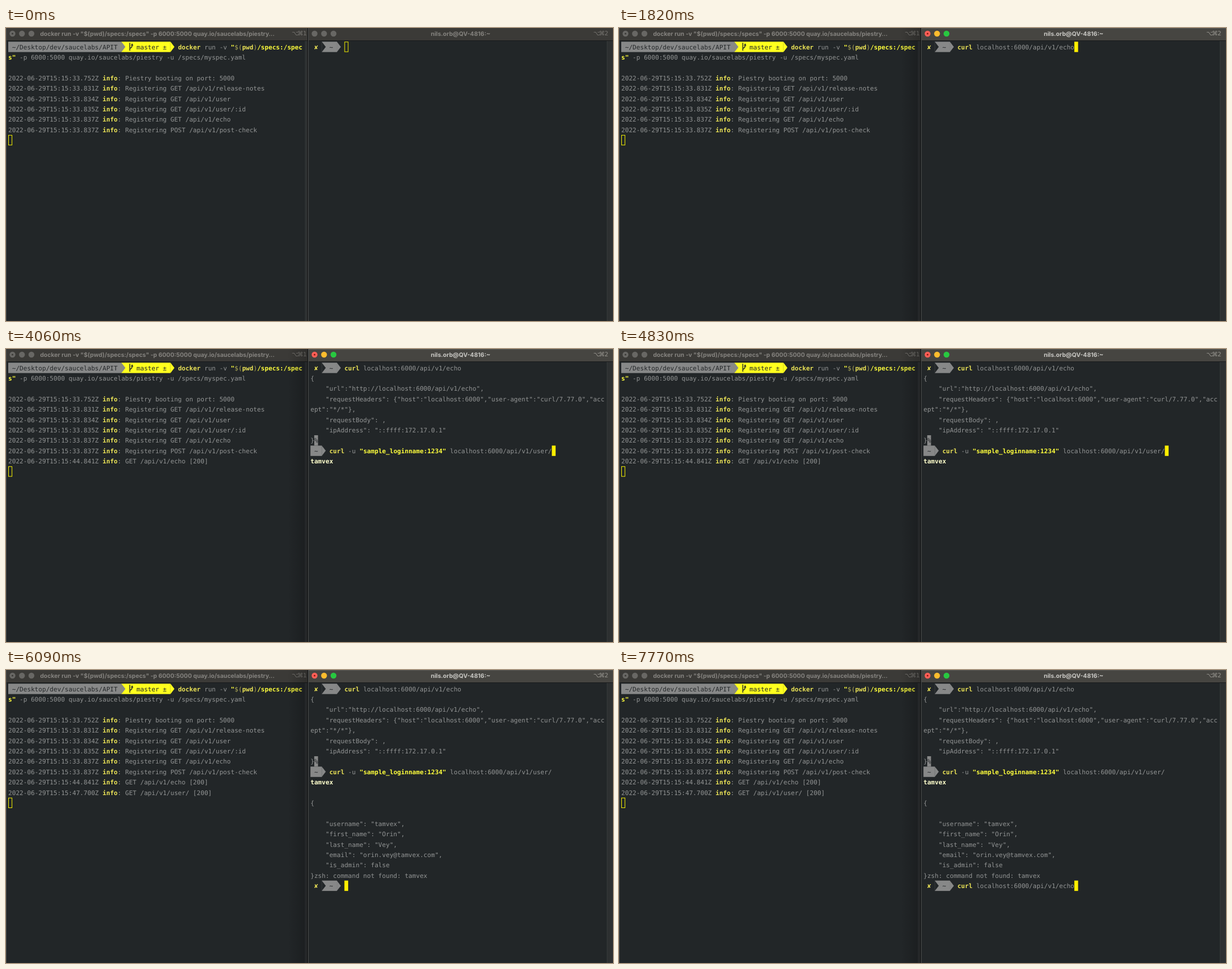
An HTML page for the animation above (8000 ms loop, 1077x520 px).

```html
<!DOCTYPE html>
<html lang="en">
<head>
<meta charset="utf-8">
<title>Two terminals</title>
<style>
  html, body { margin: 0; width: 100%; height: 100%; overflow: hidden; background: #222628; }
  svg { display: block; width: 1077px; height: 520px; }
  text { white-space: pre; text-rendering: geometricPrecision; }
  .mono { font: 11.11px "DejaVu Sans Mono", "Liberation Mono", monospace; fill: #929494; }
  .dark { fill: #242729; }
  .cmd { fill: #eae256; font-weight: bold; }
  .str { fill: #ffff3c; font-weight: bold; }
  .soft { fill: #b3ae58; }
  .pale { fill: #ffffcc; font-weight: bold; }
  .title { font: 700 10.5px Inter, "Liberation Sans", sans-serif; text-anchor: middle; }
  .keys { font: 10.5px "DejaVu Sans", sans-serif; }
</style>
</head>
<body>
<svg viewBox="0 0 1077 520" xmlns="http://www.w3.org/2000/svg">
  <defs>
    <linearGradient id="shade">
      <stop offset="0" stop-color="#000" stop-opacity="0"/>
      <stop offset="1" stop-color="#000" stop-opacity=".22"/>
    </linearGradient>
  </defs>
  <g id="stage"></g>
</svg>
<script>
const LOOP = 8000, CW = 6.692, RH = 18.39, TOP = 24.3;
const LEFT = 4, RIGHT = 540.2;
const GREY = '#878888', YELLOW = '#ffff1e', BG = '#222628';
const USER = 'tamvex', LOGIN = 'sample_loginname:1234', HOST = 'nils.orb@QV-4816:~';
const ECHO_URL = 'localhost:6000/api/v1/echo', USER_URL = 'localhost:6000/api/v1/user/';
const stage = document.getElementById('stage');

const esc = s => s.replace(/&/g, '&amp;').replace(/</g, '&lt;');
const rowY = row => TOP + row * RH;
const rect = (x, y, w, h, fill) => `<rect x="${x}" y="${y}" width="${w}" height="${h}" fill="${fill}"/>`;
const path = (d, fill) => `<path d="${d}" fill="${fill}"/>`;

// Runs are plain strings or [class, text] pairs laid out on the character grid.
function line(x0, row, col, ...runs) {
  let out = '';
  for (const run of runs) {
    const [cls, str] = Array.isArray(run) ? run : ['', run];
    out += `<text class="mono ${cls}" x="${x0 + col * CW}" y="${rowY(row) + 13.4}">${esc(str)}</text>`;
    col += str.length;
  }
  return out;
}

function block(x0, row, col, cols, fill) {
  return rect(x0 + col * CW, rowY(row), cols * CW, RH, fill);
}

function arrow(x0, row, col, fill) {
  const x = x0 + col * CW, y = rowY(row);
  return path(`M${x} ${y}l${CW + .4} ${RH / 2}L${x} ${y + RH}z`, fill);
}

function cursor(x0, row, col, solid) {
  const x = x0 + col * CW, y = rowY(row);
  return solid ? rect(x, y, CW, RH, '#ffee00')
    : `<rect x="${x + .5}" y="${y + .5}" width="${CW - .6}" height="${RH - 1}" fill="none" stroke="#f4f000"/>`;
}

function titleBar(x, w, cx, title, key, focused) {
  const ink = focused ? '#c9c8c4' : '#85837f';
  const lights = focused ? ['#fe5f57', '#febc2e', '#28c840'] : Array(3).fill('#686764');
  let out = rect(x, 0, w, 22, focused ? '#464541' : '#3b3a37') + rect(x, 22, w, 1, '#181a1b');
  if (focused) out += rect(x, 0, w, 1, '#5b5a56');
  lights.forEach((c, i) => out += `<circle cx="${x + 11.5 + i * 16.8}" cy="10" r="5.2" fill="${c}"/>`);
  if (focused || x === 0) out += `<circle cx="${x + 11.5}" cy="10" r="1.6" fill="${focused ? '#8c1a12' : '#3b3a37'}"/>`;
  out += `<text class="title" x="${cx}" y="13.6" fill="${ink}">${esc(title)}</text>`;
  const kx = x + w - (x ? 35 : 28);
  return out + `<text class="keys" x="${kx} ${kx + 10} ${kx + 20}" y="13.4" fill="${focused ? '#97958f' : '#777571'}">⌥⌘${key}</text>`;
}

const info = (row, stamp, msg) =>
  line(LEFT, row, 0, `2022-06-29T15:15:${stamp}Z `, ['cmd', 'info'], ': ' + msg);

function branchIcon() {
  const x = LEFT + 32 * CW, y = rowY(0);
  return `<g fill="none" stroke="#242729" stroke-width="1.5">` +
    `<path d="M${x + 1.5} ${y + 2}v14M${x + 1.5} ${y + 12}q4.2-1.5 4.2-6"/></g>` +
    path(`M${x + 3.4} ${y + 7}h4.4l-2.2-4.2z`, '#242729');
}

function leftPane(logs) {
  let out = block(LEFT, 0, 0, 30, GREY) + block(LEFT, 0, 30, 13, YELLOW) +
    arrow(LEFT, 0, 30, GREY) + arrow(LEFT, 0, 43, YELLOW) + branchIcon() +
    line(LEFT, 0, 1, ['dark', '~/Desktop/dev/saucelabs/APIT']) +
    line(LEFT, 0, 34, ['dark', 'master ±']) +
    line(LEFT, 0, 45, ['cmd', 'docker'], ' run -v ', ['str', '"'], ['soft', '$('],
      ['cmd', 'pwd'], ['soft', ')'], ['str', '/specs:/spec']) +
    line(LEFT, 1, 0, ['str', 's"'], ' -p 6000:5000 quay.io/saucelabs/piestry -u /specs/myspec.yaml');
  const entries = [
    ['33.752', 'Piestry booting on port: 5000'],
    ['33.831', 'Registering GET /api/v1/release-notes'],
    ['33.834', 'Registering GET /api/v1/user'],
    ['33.835', 'Registering GET /api/v1/user/:id'],
    ['33.837', 'Registering GET /api/v1/echo'],
    ['33.837', 'Registering POST /api/v1/post-check'],
    ['44.841', 'GET /api/v1/echo [200]'],
    ['47.700', 'GET /api/v1/user/ [200]']
  ].slice(0, 6 + logs);
  entries.forEach(([stamp, msg], i) => out += info(3 + i, stamp, msg));
  return out + cursor(LEFT, 3 + entries.length, 0, false);
}

// Shell prompt; returns the markup and the column where input starts.
function prompt(row, failed) {
  const at = failed ? 3 : 0, tilde = failed ? 5 : 1, end = failed ? 7 : 3;
  let out = block(RIGHT, row, at, end - at, GREY) + arrow(RIGHT, row, end, GREY);
  if (failed) out += arrow(RIGHT, row, 3, BG) + line(RIGHT, row, 1, ['cmd', '✘']);
  return [out + line(RIGHT, row, tilde, ['dark', '~']), end + 2];
}

const commands = {
  none: () => ['', 0],
  echo: (row, col) => [line(RIGHT, row, col, ['cmd', 'curl'], ' ' + ECHO_URL), 5 + ECHO_URL.length],
  user: (row, col) => [
    line(RIGHT, row, col, ['cmd', 'curl'], ' -u ', ['str', `"${LOGIN}"`], ' ' + USER_URL) +
    line(RIGHT, row + 1, 0, ['pale', USER]),
    11 + LOGIN.length + USER_URL.length]
};

function input(row, failed, name) {
  const [head, col] = prompt(row, failed);
  const [body, len] = commands[name](row, col);
  return { svg: head + body, at: [row, col + len] };
}

const echoOutput = () => [
  '{',
  `    "url":"http://${ECHO_URL}",`,
  '    "requestHeaders": {"host":"localhost:6000","user-agent":"curl/7.77.0","acc',
  'ept":"*/*"},',
  '    "requestBody": ,',
  '    "ipAddress": "::ffff:172.17.0.1"',
  '}'
].map((s, i) => line(RIGHT, 1 + i, 0, s)).join('') +
  block(RIGHT, 7, 1, 1, GREY) + line(RIGHT, 7, 1, ['dark', '%']);

const userOutput = done => [
  '{', '',
  `    "username": "${USER}",`,
  '    "first_name": "Orin",',
  '    "last_name": "Vey",',
  `    "email": "orin.vey@${USER}.com",`,
  '    "is_admin": false',
  '}' + (done ? `zsh: command not found: ${USER}` : '')
].map((s, i) => line(RIGHT, 11 + i, 0, s)).join('');

function rightPane(t) {
  const first = input(0, true, t < 1190 ? 'none' : t < 1820 ? 'user' : 'echo');
  let out = first.svg, at = first.at;
  if (t >= 2730) at = [1, 0];
  if (t >= 3010) { out += echoOutput(); at = [8, 0]; }
  if (t >= 3080) {
    const second = input(8, false, t < 3570 ? 'none' : t < 4060 ? 'echo' : 'user');
    out += second.svg;
    at = second.at;
  }
  if (t >= 5880) at = [11, 0];
  if (t >= 6020) { out += userOutput(t >= 6090); at = [18, 1]; }
  if (t >= 6090) {
    const third = input(19, true, t < 7280 ? 'none' : t < 7700 ? 'user' : 'echo');
    out += third.svg;
    at = third.at;
  }
  return out + cursor(RIGHT, ...at, t >= 630);
}

function rightTitle(t) {
  if (t >= 2730 && t < 3010) return 'curl ' + ECHO_URL;
  if (t >= 5880 && t < 6020) return `curl -u "${LOGIN}" ${USER_URL} ${USER}`;
  return HOST;
}

function render(t) {
  const focused = t >= 630;
  return rect(0, 0, 1077, 520, BG) +
    rect(531, 23, 4, 497, '#2d3031') + rect(530.5, 23, 1, 497, '#34383a') +
    titleBar(0, 535, 268.5, 'docker run -v "$(pwd)/specs:/specs" -p 6000:5000 quay.io/saucelabs/piestry…', 1, false) +
    rect(0, 0, 1, 520, '#4b4d4d') +
    leftPane((t >= 3010) + (t >= 6020)) +
    (focused ? rect(500, 0, 35, 520, 'url(#shade)') : '') +
    rect(535, 0, 1, 520, '#0e0f10') + rect(536, 23, 541, 497, BG) +
    rect(1066, 23, 11, 497, '#2d3031') + rect(1066, 23, 1, 497, '#35393a') +
    titleBar(536, 541, 806.5, rightTitle(t), 2, focused) +
    rect(536, 0, 1, 520, '#505252') +
    rightPane(t);
}

// Moments at which the picture changes.
const cuts = [630, 1190, 1820, 2730, 3010, 3080, 3570, 4060, 5880, 6020, 6090, 7280, 7700];
const start = performance.now();
let shown = -1;

function tick() {
  const t = (performance.now() - start) % LOOP;
  const step = cuts.filter(c => c <= t).length;
  if (step !== shown) {
    stage.innerHTML = render(t);
    shown = step;
  }
  requestAnimationFrame(tick);
}
tick();
</script>
</body>
</html>
```
